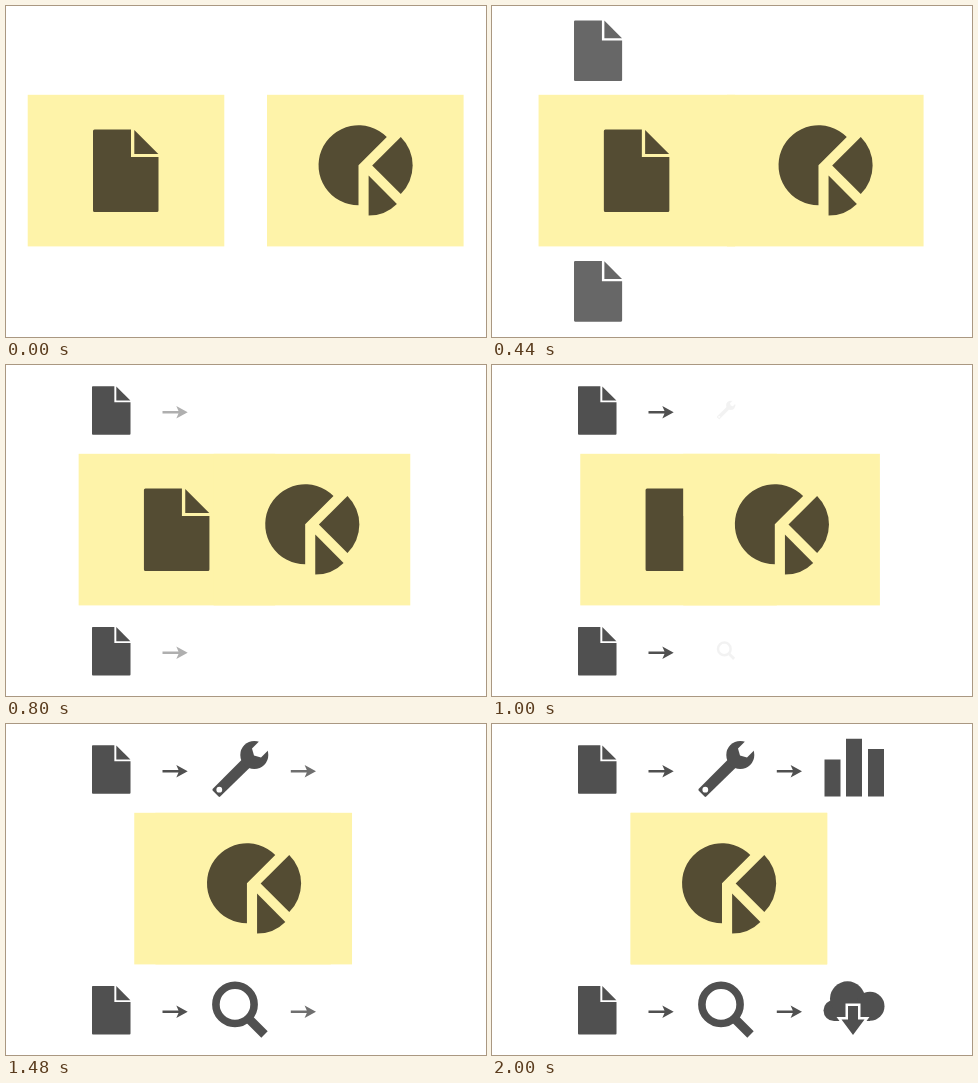
Animation of 480x331 px, one loop 2280 ms. Source, as an HTML page:

```html
<!DOCTYPE html>
<html lang="en">
<head>
<meta charset="utf-8">
<title>Merging panels</title>
<style>
  html, body { margin: 0; width: 100%; height: 100%; overflow: hidden; background: #fff; }
  svg { display: block; width: 100vw; height: 100vh; }
  .panel { fill: #fef3a9; }
  .panel + * { fill: #544c33; }
  #icons { fill: #505050; }
</style>
</head>
<body>
<svg viewBox="0 0 480 331">
  <defs>
    <g id="page">
      <path d="M1.5 0H38V27.5H65.5V81A1.5 1.5 0 0 1 64 82.5H1.5A1.5 1.5 0 0 1 0 81V1.5A1.5 1.5 0 0 1 1.5 0Z"/>
      <path d="M41.3 .3L65.3 24.3H41.3Z"/>
    </g>
    <path id="arrow" d="M0 -1.2H16L13.8 -6.3L25.2 0L13.8 6.3L16 1.2H0Z"/>
    <g id="wrench">
      <path d="M206.8 64.8L238 33.5L246 41.5L214.2 72.6Q213.4 73.2 212.6 72.6L206.8 66.8Q206 65.8 206.8 64.8Z"/>
      <circle cx="248.3" cy="31" r="14"/>
      <path fill="#fff" d="M255 15.5L246 24.5L248 31.5L255 33.5L264 24.5V15.5Z"/>
      <circle fill="#fff" cx="213.3" cy="65.7" r="2.9"/>
    </g>
    <g id="lens" fill="none" stroke="#505050">
      <circle cx="229" cy="280.4" r="19.1" stroke-width="7.6"/>
      <path d="M243 295L258.5 310.5" stroke-width="9"/>
    </g>
    <path id="bars" d="M332.5 35.5h16v37h-16ZM354 14.7h16v57.8h-16ZM376 25h16v47.5h-16Z"/>
    <g id="cloud">
      <circle cx="342" cy="286.5" r="10.5"/>
      <circle cx="355.5" cy="274.8" r="17.5"/>
      <circle cx="378" cy="282.3" r="14.5"/>
      <path d="M342 280H378V297H342Z"/>
      <path d="M356 282H366V295.5H372.5L361 311L349.5 295.5H356Z"
            stroke="#fff" stroke-width="5" paint-order="stroke"/>
    </g>
  </defs>

  <g id="left">
    <rect class="panel" x="21.7" y="88.8" width="196.6" height="151.6"/>
    <use href="#page" x="87" y="123.6"/>
  </g>
  <g id="right">
    <rect class="panel" x="261" y="88.8" width="196.6" height="151.6"/>
    <g>
      <path d="M352.5 159.3V199.3A40 40 0 1 1 380.8 131Z"/>
      <path d="M366.2 159.5L394.8 130.9A40.4 40.4 0 0 1 394.8 188.1Z"/>
      <path d="M362.6 169.6L390.9 197.9A40 40 0 0 1 362.6 209.6Z"/>
    </g>
  </g>
  <g id="icons"></g>
</svg>
<script>
  const LOOP = 2280, STEP = 40, LAST = 2000, MERGE = 1600;
  const left = document.getElementById('left');
  const right = document.getElementById('right');
  const icons = document.getElementById('icons');
  const clamp = v => Math.min(1, Math.max(0, v));

  function addIcon(id, placement, timing) {
    const group = document.createElementNS('http://www.w3.org/2000/svg', 'g');
    group.innerHTML = `<use href="#${id}" transform="${placement}"/>`;
    icons.append(group);
    return { group, ...timing };
  }

  const pop = (id, start, peak, cx, cy, placement = '') =>
    addIcon(id, placement, { start, peak, cx, cy, fade: 300 });
  const arrow = (start, x, y) =>
    addIcon('arrow', `translate(${x} ${y})`, { start, fade: 220 });

  const items = [
    pop('page', 180, 1.29, 102, 48.5, 'translate(86 21.2) scale(.588)'),
    pop('page', 180, 1.29, 102, 289.2, 'translate(86 261.9) scale(.588)'),
    arrow(700, 156.5, 47.2),
    arrow(700, 156.5, 287.7),
    pop('wrench', 980, 1.22, 234, 45),
    pop('lens', 980, 1.22, 234, 285.6),
    arrow(1300, 284.8, 47.2),
    arrow(1300, 284.8, 287.7),
    pop('bars', 1640, 1.17, 362.2, 43.6),
    pop('cloud', 1640, 1.17, 362.2, 284.2)
  ];

  // Grows quickly past full size, then settles back to 1.
  function popScale(age, peak) {
    if (age < 200) return peak * (1 - (1 - clamp(age / 200)) ** 3);
    return peak - (peak - 1) * clamp((age - 200) / 160) ** 2;
  }

  function render(ms) {
    const t = Math.min(LAST, Math.floor((ms % LOOP) / STEP) * STEP);
    const merged = clamp(t / MERGE) ** 1.2;
    left.setAttribute('transform', `translate(${117 * merged} 0)`);
    right.setAttribute('transform', `translate(${-122.5 * merged} 0)`);
    for (const { group, start, fade, peak, cx, cy } of items) {
      const age = t - start;
      group.setAttribute('visibility', age > 0 ? 'visible' : 'hidden');
      group.setAttribute('opacity', clamp(age / fade));
      if (peak) {
        const s = popScale(age, peak);
        group.setAttribute('transform', `translate(${cx} ${cy}) scale(${s}) translate(${-cx} ${-cy})`);
      }
    }
  }

  const began = performance.now();
  function tick() {
    render(performance.now() - began);
    requestAnimationFrame(tick);
  }
  tick();
</script>
</body>
</html>
```
